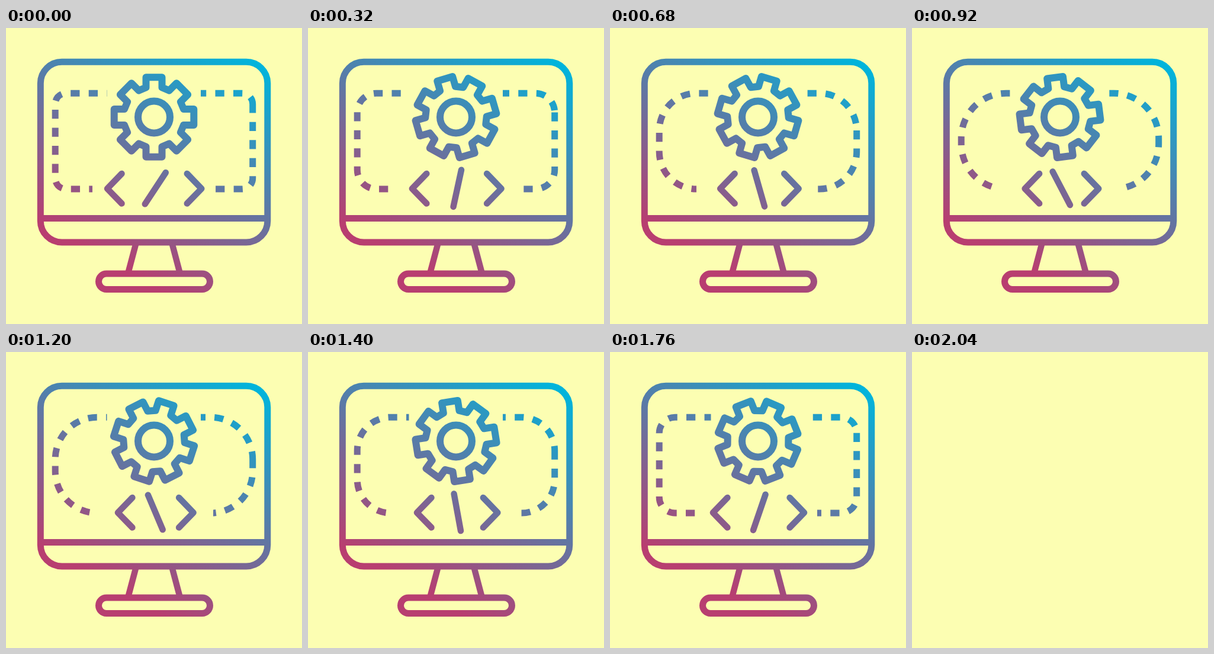
Animation of 500 by 500 pixels, one loop 2080 ms. Source, as an HTML page with a canvas:

```html
<!DOCTYPE html>
<html lang="en">
<head>
<meta charset="utf-8">
<title>Coding monitor</title>
<style>
  html, body { margin: 0; width: 100%; height: 100%; overflow: hidden; background: #fcfeb2; }
  canvas { display: block; width: 500px; height: 500px; }
</style>
</head>
<body>
<canvas id="stage"></canvas>
<script>
const SIZE = 500, LOOP = 2080, STEP = 40, CYCLE = 2000;
const canvas = document.getElementById('stage');
const ctx = canvas.getContext('2d');
const ratio = window.devicePixelRatio || 1;
canvas.width = canvas.height = SIZE * ratio;
ctx.scale(ratio, ratio);

const ink = ctx.createLinearGradient(169, 391, 374, 32);
ink.addColorStop(0, '#b83e70');
ink.addColorStop(1, '#00b4db');

const rad = deg => deg * Math.PI / 180;
const mix = (a, b, k) => a + (b - a) * k;
const smooth = u => u * u * (3 - 2 * u);

// Cubic ease with flat ends and handles at x1 and x2.
function ease(u, x1, x2) {
  let lo = 0, hi = 1;
  for (let i = 0; i < 24; i++) {
    const s = (lo + hi) / 2, r = 1 - s;
    const x = 3 * s * r * r * x1 + 3 * s * s * r * x2 + s * s * s;
    if (x < u) lo = s; else hi = s;
  }
  return smooth(lo);
}

function line(points, width = 11) {
  ctx.beginPath();
  points.forEach(([x, y]) => ctx.lineTo(x, y));
  ctx.lineWidth = width;
  ctx.stroke();
}

// Clockwise from the end of the top right corner.
function roundRect(l, t, r, b, radius) {
  ctx.beginPath();
  ctx.moveTo(r, t + radius);
  ctx.arcTo(r, b, l, b, radius);
  ctx.arcTo(l, b, l, t, radius);
  ctx.arcTo(l, t, r, t, radius);
  ctx.arcTo(r, t, r, b, radius);
  ctx.closePath();
  ctx.lineWidth = 11;
  ctx.stroke();
}

function drawMonitor() {
  roundRect(58.3, 57.3, 441.8, 362, 36);
  line([[62, 321.5], [438, 321.5]]);
  line([[219.5, 364], [206.5, 413]], 10.5);
  line([[280.5, 364], [293.5, 413]], 10.5);
  roundRect(156.5, 415, 344.5, 441.5, 13.2);
}

function drawDashes(radius) {
  ctx.save();
  ctx.beginPath();
  ctx.rect(0, 0, SIZE, SIZE);
  ctx.rect(170.5, 90, 158.5, 40);
  ctx.rect(146, 250, 204, 40);
  ctx.clip('evenodd');
  ctx.lineCap = 'butt';
  ctx.setLineDash([15.27, 15.27]);
  roundRect(83.2, 110.2, 416.7, 272, radius);
  ctx.restore();
}

function drawGear(angle) {
  const tooth = [[-13.5, -50], [-13.5, -67.3], [13.5, -67.3], [13.5, -50]];
  ctx.beginPath();
  for (let i = 0; i < 8; i++) {
    const a = rad(angle + i * 45), c = Math.cos(a), s = Math.sin(a);
    tooth.forEach(([x, y]) => ctx.lineTo(250 + x * c - y * s, 150.5 + x * s + y * c));
  }
  ctx.closePath();
  ctx.lineWidth = 12;
  ctx.stroke();
  ctx.beginPath();
  ctx.arc(250, 150.5, 27, 0, Math.PI * 2);
  ctx.stroke();
}

function drawCode(k, tilt) {
  const bracket = (x, dir) =>
    line([[x + 24.5 * dir, 246], [x, 271.3], [x + 24.5 * dir, 296.5]], 10.5);
  bracket(mix(171, 191, k), 1);
  bracket(mix(330.3, 315, k), -1);
  const dx = 31.8 * Math.sin(rad(tilt)), dy = 31.8 * Math.cos(rad(tilt));
  line([[252.3 + dx, 270.8 - dy], [252.3 - dx, 270.8 + dy]], 10.5);
}

function draw(time) {
  ctx.fillStyle = '#fcfeb2';
  ctx.fillRect(0, 0, SIZE, SIZE);
  if (time > CYCLE) return;
  ctx.strokeStyle = ink;
  ctx.lineCap = ctx.lineJoin = 'round';
  const half = CYCLE / 2;
  const u = 1 - Math.abs(time - half) / half;
  const k = smooth(u);
  drawMonitor();
  drawDashes(mix(18, 77, k));
  drawGear(180 * time / CYCLE);
  drawCode(k, mix(33.4, -28.6, ease(u, 0.167, 0.667)));
}

const start = performance.now();
function tick() {
  const time = (performance.now() - start) % LOOP;
  draw(Math.floor(time / STEP) * STEP);
  requestAnimationFrame(tick);
}
tick();
</script>
</body>
</html>
```
